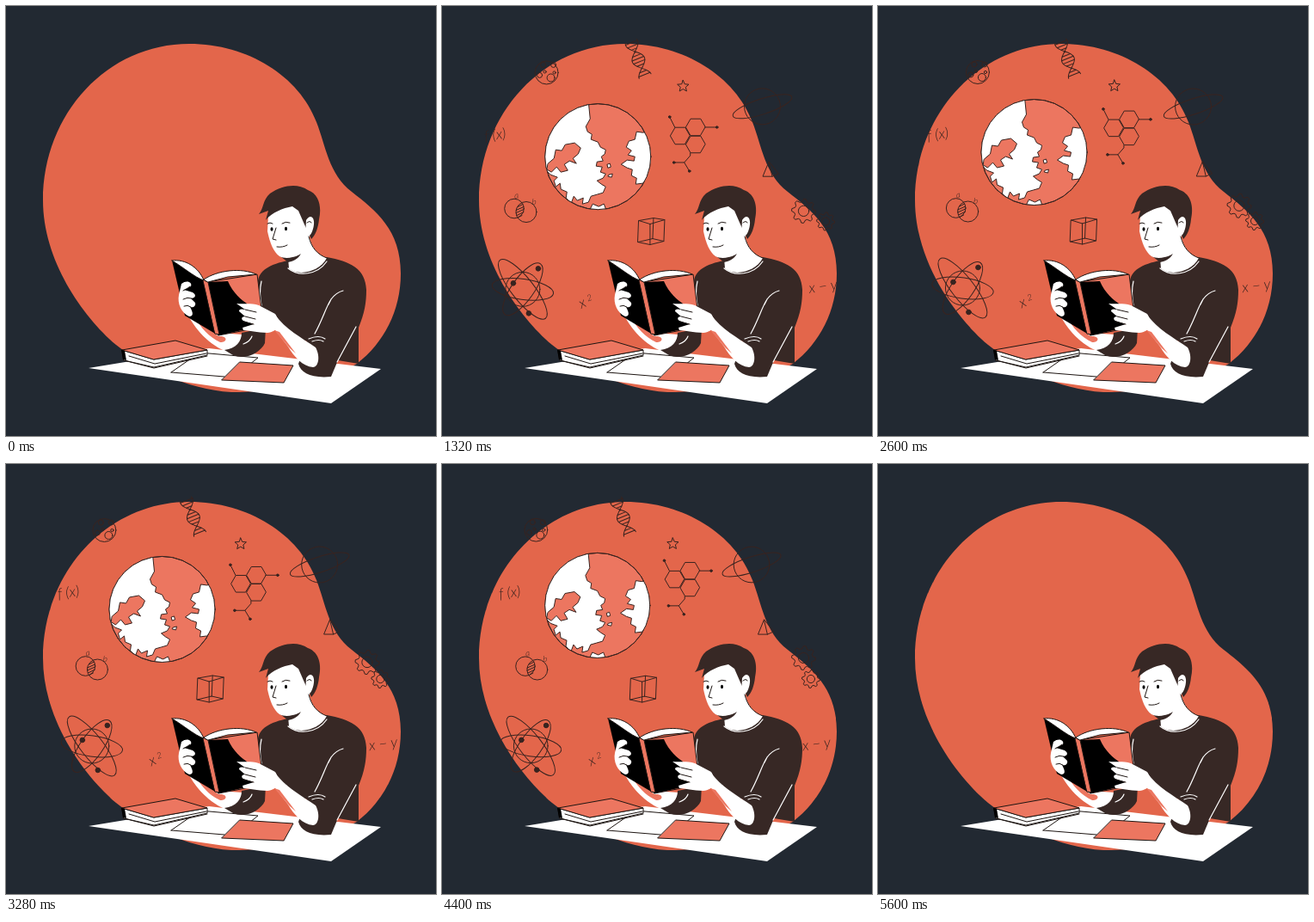
An HTML page for the animation above (6000 ms loop, 500 by 500 pixels).

```html
<!DOCTYPE html>
<html lang="en">
<head>
<meta charset="utf-8">
<title>Reading science</title>
<style>
html, body { margin: 0; width: 100%; height: 100%; overflow: hidden; background: #222932; }
svg { display: block; width: 100vw; height: 100vh; }
.ink { fill: none; stroke: #38231f; stroke-width: 1; stroke-linecap: round; stroke-linejoin: round; }
.ink text { font: italic 300 17px Lato, "Open Sans", sans-serif; fill: #38231f; stroke: none; text-anchor: middle; }
.ink .small { font-size: 10px; }
.dot { fill: #38231f; }
.white { fill: #fff; }
.coral { fill: #ec7660; }
.dark { fill: #372825; }
.black { fill: #000; }
.line { fill: none; stroke: #fff; stroke-width: 1.2; stroke-linecap: round; }
.edge { stroke: #1d1512; stroke-width: 1; stroke-linejoin: round; stroke-linecap: round; }
.none { fill: none; }
</style>
</head>
<body>
<svg viewBox="0 0 500 500">
  <defs><clipPath id="globe"><circle r="61.5"/></clipPath></defs>
  <path fill="#e3664b" d="M213 44C282 44 341 82 361 135C372 163 375 195 402 216C430 238 459 260 459 311C459 355 439 392 408 416C365 440 315 449 262 449C210 446 160 420 128 394C88 360 43 295 43 226C43 125 118 44 213 44Z"/>
  <g id="icons" class="ink"></g>

  <g id="desk">
    <path class="white" d="M96 421L236 398L436 422L378 462Z"/>
    <path class="edge none" d="M192 426L225 403L293 409L283 417M192 426L254 431"/>
    <path class="coral edge" d="M272 414L334 418L323 438L251 435Z"/>
    <path class="white edge" d="M135 400L172 411L234 400L234 406L172 420L137 412Z"/>
    <path class="coral edge" d="M135 400L197 389L234 400L172 411Z"/>
    <path class="edge none" stroke-width="2" d="M143 407L173 416L233 404M137 412L172 421L234 407"/>
    <path class="black" d="M134 400L138 401L140 412L136 411Z"/>
  </g>

  <g id="reader">
    <path class="white" d="M211 358C222 380 240 397 264 405L276 382L245 380Z"/>
    <path class="coral" d="M219 360L247 384C258 383 258 391 249 391C236 385 226 374 219 360Z"/>
    <path class="dark" d="M328 296C308 300 293 307 293 322L297 352L313 362C324 376 338 386 350 390L340 416C343 427 355 433 378 431L386 412L410 416L410 374C417 357 419 345 419 330C418 305 400 297 373 292Z"/>
    <path class="dark" d="M274 380L302 374L301 392C296 403 279 412 264 406L254 400C268 398 274 390 274 380Z"/>
    <path class="white" d="M296 350L313 359C324 375 344 386 360 397C366 408 363 420 357 420C345 419 335 408 328 396L313 377L296 378Z"/>
    <path class="coral" d="M312 377L318 379L337 404L330 398Z"/>
    <path class="white" d="M352 266C355 281 362 289 373 293C365 309 340 315 329 305L328 293Z"/>
    <path class="dark" d="M315 288C326 295 338 292 343 288C339 295 333 297 328 298Z"/>
    <path class="white" d="M305 244L304 262C307 276 311 286 318 291C328 296 340 291 347 282L353 268L349 236L325 230Z"/>
    <path class="dark" d="M294 242C300 235 298 226 307 218C322 208 339 206 351 214C365 219 367 235 364 248C363 258 360 266 355 271L347 254L340 238L333 233C322 235 309 240 302 249L305 238Z"/>
    <path class="white" d="M349 249C354 241 359 246 358 254C357 263 353 270 348 268Z"/>
    <path class="edge none" d="M304 253Q307 251 310 253M321 253Q325 250 330 252M314 258L310 271L314 272M315 280Q322 281 327 278M352 268C355 281 362 289 373 293M350 252Q354 249 355 252"/>
    <ellipse class="black" cx="309" cy="259.500" rx="1.500" ry="2.300"/>
    <ellipse class="black" cx="325.500" cy="259" rx="1.500" ry="2.300"/>
    <path class="line" d="M328 305C340 315 362 313 373 297M359 381C368 365 372 350 378 341Q384 333 392 331M378 341L375 347M385 414L407 373M352 387Q364 382 371 387M356 390Q364 387 369 390M297 320Q294 333 297 348M276 393Q284 390 286 384"/>
    <path class="black" d="M193 296L229 318L245 382L208 360Z"/>
    <path class="coral edge" d="M234 321L292 312L297 352L289 375L247 383Z"/>
    <path class="black" d="M235 321L258 320C264 334 274 342 280 346L288 374L247 383Z"/>
    <path class="coral edge" d="M229 318L235 321L248 382L243 381Z"/>
    <path class="white edge" d="M193 296C209 294 224 304 230 319C220 316 205 303 193 296Z"/>
    <path class="white edge" d="M230 318C246 307 274 304 291 312L258 315L235 321Z"/>
    <path class="white" d="M204 323C210 318 217 321 215 326L207 330L217 333C222 336 220 340 215 340L220 345C221 349 218 351 214 350C218 357 218 361 213 361C204 357 199 346 201 336Z"/>
    <path class="edge none" d="M206 331Q211 329 214 326M206 341Q211 338 216 340M207 349Q211 347 215 350"/>
    <path class="white" d="M268 346C277 347 284 345 294 348L313 358C320 369 316 379 304 380C292 380 283 377 276 377L275 374L288 370L276 366C273 364 274 361 278 361L271 355C271 352 274 352 278 353Z"/>
    <path class="edge none" d="M278 353L291 356M278 361L290 364M276 367L288 370"/>
  </g>
</svg>
<script>
const path = d => `<path d="${d}"/>`;
const circle = (x, y, r, cls = '') => `<circle cx="${x}" cy="${y}" r="${r}" class="${cls}"/>`;
const ellipse = (rx, ry, turn) => `<ellipse rx="${rx}" ry="${ry}" transform="rotate(${turn})"/>`;
const text = (s, x, y, turn = -8, cls = '') =>
  `<text class="${cls}" transform="translate(${x} ${y}) rotate(${turn})">${s}</text>`;

// Closed polygon from n points given in polar form.
function ring(n, radius, x = 0, y = 0, start = 0) {
  let d = '';
  for (let i = 0; i < n; i++) {
    const a = start + i * 2 * Math.PI / n, r = radius(i);
    d += `${i ? 'L' : 'M'}${(x + r * Math.cos(a)).toFixed(2)} ${(y + r * Math.sin(a)).toFixed(2)}`;
  }
  return path(d + 'Z');
}
const hexagon = (x, y) => ring(6, () => 11.3, x, y);
const gear = r => ring(32, i => (i % 4 < 2 ? r : r * 0.77)) + circle(0, 0, r * 0.44);

function helix() {
  const wave = (u, side) => side * 7.5 * Math.sin((u + 10) * Math.PI / 21);
  let out = '';
  for (const side of [-1, 1]) {
    let d = '';
    for (let u = -23; u <= 21; u++) d += `${d ? 'L' : 'M'}${wave(u, side).toFixed(2)} ${u}`;
    out += path(d);
  }
  for (let u = -21; u <= 21; u += 4) out += path(`M${wave(u, -1)} ${u}L${wave(u, 1)} ${u}`);
  return `<g transform="rotate(-22)">${out}</g>`;
}

const earth = `<circle r="61.5" class="coral"/><g clip-path="url(#globe)">
<path class="white" d="M-11 -64L-9 -44L-14 -35L-12 -29L-7 -26L-8 -20L0 -17L3 -11L9 -8L8 -3L4 0L6 5L-1 6L-2 11L5 12L3 18L9 20L6 25L-1 28L4 32L9 35L6 42L-1 44L-8 46L-11 53L-18 55L-17 48L-24 51L-28 46L-31 54L-37 48L-36 41L-43 38L-44 31L-49 35L-51 28L-47 24L-55 21L-64 12L-64 -64Z"/>
<path class="coral" d="M-58 8L-51 2L-49 -8L-42 -7L-38 -14L-27 -16L-20 -10L-23 -3L-29 2L-25 8L-33 5L-39 9L-35 16L-43 18L-48 12L-54 18L-59 15Z"/>
<path class="white" d="M64 -30L52 -28L45 -29L43 -20L36 -18L33 -11L39 -7L35 -2L43 0L42 5L34 4L27 9L34 13L40 15L39 22L45 25L44 32L52 31L64 20Z"/>
<path class="white" d="M-9 61L-6 55L1 58L7 55L10 63Z"/>
<path class="white" d="M11 9L14 8L15 12L12 13ZM13 21L17 20L16 24L12 23Z"/>
</g><circle r="61.5"/>`;

const moon = circle(0, 0, 13.5) + circle(8, -9, 3) + circle(-4, -9, 3) + circle(-8, 3, 3)
  + circle(5, 6, 4.5) + circle(-2, -1, 1.6) + circle(9, 0, 1.6);

const molecule = hexagon(2, -19) + hexagon(-16, -9) + hexagon(2, 1)
  + path('M13 -19H27M-22 -19L-28 -31M-4 11V14L-11 22H-23M-11 22L-5 32')
  + circle(27, -19, 1.3, 'dot') + circle(-28, -31, 1.3, 'dot')
  + circle(-23, 22, 1.3, 'dot') + circle(-5, 32, 1.3, 'dot');

const venn = circle(-7, -1, 11.3) + circle(7, 3, 12)
  + path('M-3 -3L3 -6M-5 1L4 -3M-5 4L4 0M-4 7L4 3M-2 9L2 7')
  + text('a', -4, -13, -8, 'small') + text('b', 16, -6, 0, 'small');

const atom = circle(0, 0, 20) + ellipse(36, 12, 8) + ellipse(43, 13, 52) + ellipse(36, 13, -55)
  + circle(18, -24, 2.8, 'dot') + circle(-11, -7, 2.8, 'dot') + circle(7, 28, 2.8, 'dot');

const cube = path('M-14 -13L3 -16L16 -14L15 11L-1 15L-15 12ZM-1 -9L-14 -13M-1 -9L16 -14M-1 -9V15M2 8L3 -16M2 8L-15 12M2 8L15 11');

// drawing, rest [x, y], drift per second [x, y], entry offset [x, y], exit offset [x, y]
const table = [
  [moon, [113, 77], [-2.3, 0], [30, 5], [-16, -2]],
  [helix(), [215, 62], [-4.5, 0], [19, 2], [-13, 1]],
  [ring(10, i => i % 2 ? 3.2 : 7, 0, 0, -Math.PI / 2), [271, 93], [-3, 0], [18, 4], [-7, -1]],
  [circle(0, 0, 21) + ellipse(36, 9, -18), [363, 117], [-2.8, 0], [26, -2], [-10, 0]],
  [path('M-2 -9L-9 8L2 8L9 5ZM-2 -9L2 8'), [378, 190], [-1, 0], [16, 2], [-7, 1]],
  [gear(14), [420, 229], [0, -2.5], [6, 33], [3, -14.5]],
  [gear(10.5), [433, 250], [-4, 0], [32, 5], [-13, 0]],
  [text('x − y', 0, 5), [438, 326], [-2, 0], [7, 7], [-6, 1]],
  [cube, [236, 262], [-2, 0], [20, 6], [-9, 1]],
  [molecule, [288, 146], [-1.5, -3.8], [9.5, 47], [-6.5, -6.5]],
  [text('f (x)', 0, 6), [76, 149], [4.5, 0], [-22, 5], [7, 1]],
  [venn, [101, 236], [2.6, 0], [-37, 6], [10, 1]],
  [atom, [101, 328], [2, 0], [-22, 15], [8, -1]],
  [text('x', -3, 7, -25) + text('2', 4, -1, -20, 'small'), [177, 343], [2.8, 0], [-16, 5], [6, 0]],
  [earth, [181.5, 168], [0, -1.6], [-2.5, 34], [-5, -18]],
];

const layer = document.getElementById('icons');
layer.innerHTML = table.map(row => `<g>${row[0]}</g>`).join('');
const parts = [...layer.children];

const LOOP = 6000, STEP = 40, END = 5.6;
const clamp = v => Math.max(0, Math.min(1, v));

function draw(t) {
  // Quartic ease out on entry, quartic ease in on exit.
  const enter = (Math.max(0, 1 - t / 2) / 0.62) ** 4;
  const exit = (Math.max(0, t - 3.6) / 1.28) ** 4;
  const scale = Math.max(0, 1 - 0.05 * exit);
  layer.setAttribute('opacity', Math.min(clamp(t / 0.5), clamp((END - t) / 0.6)));
  table.forEach(([, rest, drift, from, to], n) => {
    const [x, y] = rest.map((p, i) => p + drift[i] * (t - 3.88) + from[i] * enter + to[i] * exit);
    parts[n].setAttribute('transform', `translate(${x.toFixed(2)} ${y.toFixed(2)}) scale(${scale.toFixed(4)})`);
  });
}

const begin = performance.now();
function tick(now) {
  const ms = Math.max(0, now - begin) % LOOP;
  draw(Math.floor(ms / STEP) * STEP / 1000);
  requestAnimationFrame(tick);
}
draw(0);
requestAnimationFrame(tick);
</script>
</body>
</html>
```
